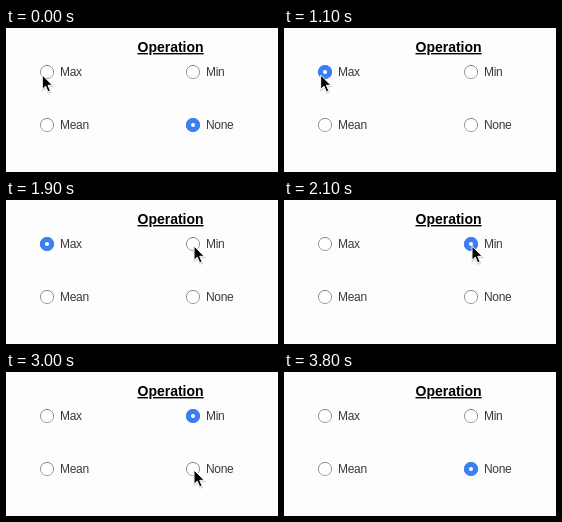
Recreate the animation shown at these times as an HTML page. Size 272 by 144 pixels, loop 4600 ms.

```html
<!DOCTYPE html>
<html lang="en">
<head>
<meta charset="utf-8">
<title>Operation</title>
<style>
  html, body { margin: 0; width: 100%; height: 100%; overflow: hidden; background: #fdfdfd; }
  svg { display: block; width: 100%; height: 100%; }
  text { font: 12px "Liberation Sans", Arial, sans-serif; letter-spacing: -.3px; fill: #3a3a3a; }
  .title { font-size: 14px; font-weight: bold; letter-spacing: 0; fill: #000; text-decoration: underline 1px; }
</style>
</head>
<body>
<svg viewBox="0 0 272 144">
  <defs>
    <linearGradient id="rim" x2="0" y2="1">
      <stop stop-color="#858585"/>
      <stop offset="1" stop-color="#a2a2a2"/>
    </linearGradient>
    <path id="arrow" d="M0 0V14.2L3.3 11.2L5.7 16.8L8.1 15.8L5.7 10.3H10.2Z"/>
    <g id="ring"><circle r="6.6" fill="#fff" stroke="url(#rim)"/></g>
    <g id="dot"><circle r="7.1" fill="#3b7ff5"/><circle r="2" fill="#fff"/></g>
  </defs>
  <text class="title" x="131.5" y="24">Operation</text>
  <g id="options"></g>
  <g id="cursor">
    <use href="#arrow" x=".3" y="1.2" stroke="#000" stroke-width="1.5" opacity=".14"/>
    <use href="#arrow" stroke="#fff" stroke-linejoin="round"/>
  </g>
</svg>
<script>
const LOOP = 4600, STEP = 100, HIDE = 3700;
const labels = ["Max", "Min", "Mean", "None"];
const clicks = [
  { start: 300, label: "Max" },
  { start: 2000, label: "Min" },
  { start: 3200, label: "None" }
];

const easeOut = k => 1 - (1 - k) ** 2.5;
const easeInOut = k => k < .5 ? 16 * k ** 5 : 1 - 16 * (1 - k) ** 5;

// Pointer moves; bow bends the straight line sideways
const home = [36.3, 47];
const moves = [
  { start: 1000, end: 1600, to: [223, 46], bow: [0, 6], ease: easeInOut },
  { start: 1600, end: 1900, to: [188, 46], bow: [0, 0], ease: easeOut },
  { start: 2500, end: 3000, to: [188, 98], bow: [-3, 0], ease: easeOut }
];

const cursor = document.getElementById("cursor");
const group = document.getElementById("options");
group.innerHTML = labels.map((label, i) => {
  const x = 41 + 146 * (i % 2), y = 44 + 53 * Math.floor(i / 2);
  return `<use href="#ring" x="${x}" y="${y}"/>
    <use href="#dot" class="mark" x="${x}" y="${y}"/>
    <text x="${x + 13}" y="${y + 4}">${label}</text>`;
}).join("");
const marks = [...group.querySelectorAll(".mark")];

const clamp = k => Math.min(1, Math.max(0, k));

// Goes from 0 to 1 in two steps, the first one half way
const fade = (t, start) => clamp((t - start + STEP) / (2 * STEP));

function pointerAt(t) {
  return moves.reduce((from, { start, end, to, bow, ease }) => {
    const p = ease(clamp((t - start) / (end - start)));
    return from.map((v, i) => v + (to[i] - v) * p + bow[i] * Math.sin(Math.PI * p));
  }, home);
}

function strength(label, t) {
  return clicks.reduce(
    (value, click) => value + ((click.label === label) - value) * fade(t, click.start),
    label === "None" ? 1 : 0);
}

function draw(time) {
  const t = Math.floor(time % LOOP / STEP) * STEP;
  marks.forEach((mark, i) => mark.setAttribute("opacity", strength(labels[i], t)));
  cursor.setAttribute("transform", `translate(${pointerAt(t)})`);
  cursor.setAttribute("opacity", 1 - fade(t, HIDE));
}

let begin;
function frame(now) {
  begin ??= now;
  draw(now - begin);
  requestAnimationFrame(frame);
}
draw(0);
requestAnimationFrame(frame);
</script>
</body>
</html>
```
